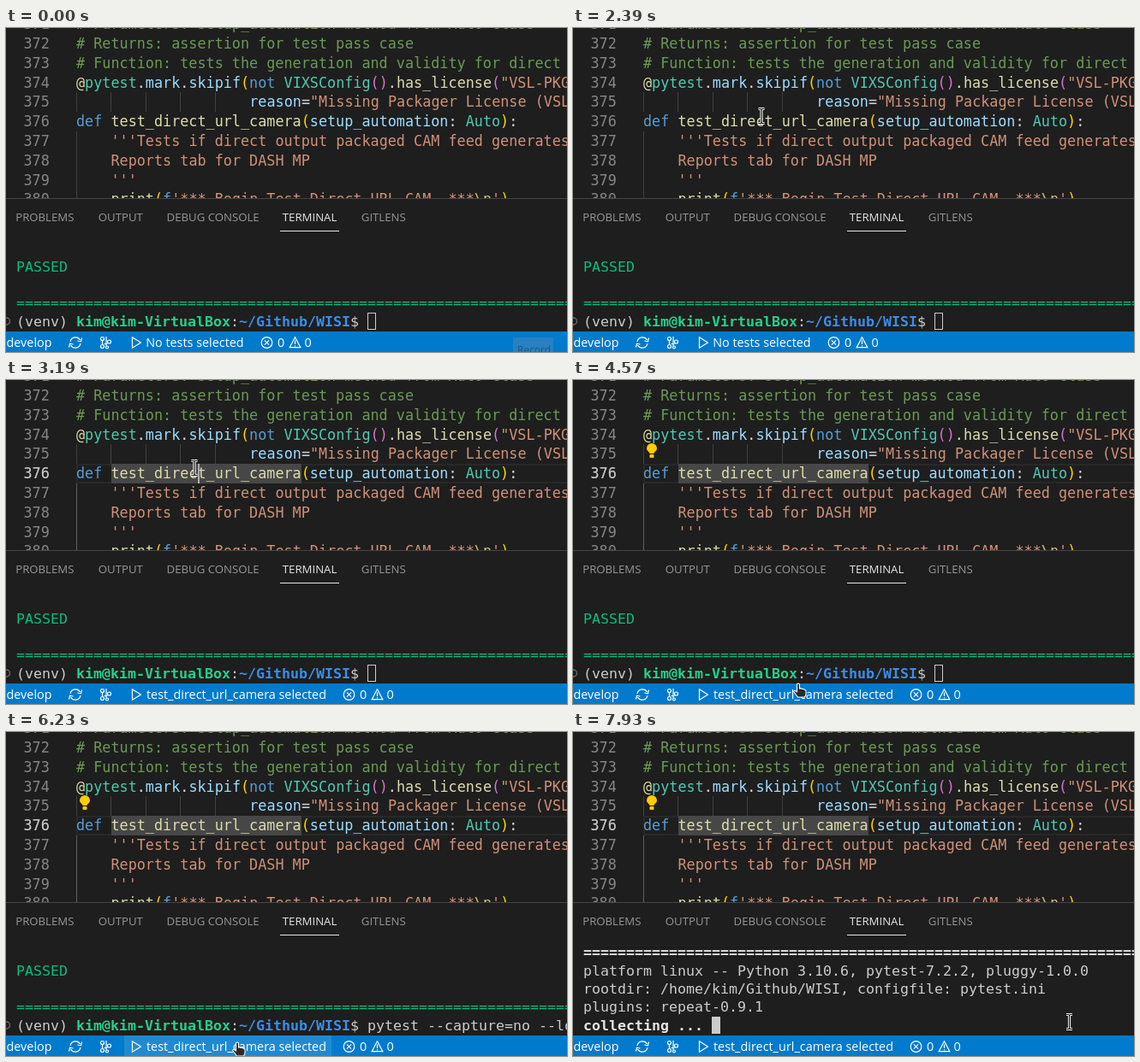
These frames come from a looping animation (655x379 px, 8000 ms). An HTML page:

```html
<!DOCTYPE html>
<html lang="en">
<head>
<meta charset="utf-8">
<title>Editor and terminal</title>
<style>
html, body { margin: 0; width: 100%; height: 100%; overflow: hidden; background: #1e1e1e; }
svg { display: block; }
text { white-space: pre; fill: #d4d4d4; }
.code { font: 16.8px "DejaVu Sans Mono", monospace; }
.term { font: 16.61px "DejaVu Sans Mono", monospace; fill: #ccc; }
.tab { font: 13.2px "Open Sans", "Noto Sans", sans-serif; fill: #979797; }
.bar { font: 14.4px "Open Sans", "Noto Sans", sans-serif; fill: #fff; }
.num { fill: #858585; }
.now { fill: #c6c6c6; }
.com { fill: #6a9955; }
.key { fill: #569cd6; }
.fn { fill: #dcdcaa; }
.var { fill: #9cdcfe; }
.cls { fill: #4ec9b0; }
.str { fill: #ce9178; }
.esc { fill: #d7ba7d; }
.b1 { fill: #ffd700; }
.b2 { fill: #da70d6; }
.ok { fill: #0dbc79; }
.user { fill: #23d18b; font-weight: bold; }
.path { fill: #3b8eea; font-weight: bold; }
.bold { fill: #e5e5e5; font-weight: bold; }
.on { fill: #e7e7e7; }
.icon { fill: none; stroke: #fff; stroke-width: 1.2; }
</style>
</head>
<body>
<svg id="stage" width="655" height="379" viewBox="0 0 655 379"></svg>
<script>
const LOOP = 8000, CHAR = 10.114, LEFT = 82, NUM_X = 20.5;
const rule = '='.repeat(70);

// Parts are plain strings or [class, string] pairs.
const text = (cls, x, y, ...parts) => `<text class="${cls}" x="${x}" y="${y}">` +
  parts.map(p => typeof p === 'string' ? p : `<tspan class="${p[0]}">${p[1]}</tspan>`).join('') + '</text>';
const rect = (x, y, w, h, fill, more = '') =>
  `<rect x="${x}" y="${y}" width="${w}" height="${h}" fill="${fill}" ${more}/>`;
const group = (id, ...items) => `<g id="${id}">${items.join('')}</g>`;

const rowTop = n => Math.round(98 + (n - 376) * 22.8);
const baseline = n => Math.round(115.2 + (n - 376) * 22.8);
const codeLine = (n, indent, ...parts) =>
  text('code num', NUM_X, baseline(n), String(n)) +
  text('code', LEFT + indent * CHAR, baseline(n), ...parts);
const guides = (first, last, cols) => cols.map(c =>
  rect(Math.round(LEFT + c * CHAR), rowTop(first), 1, rowTop(last + 1) - rowTop(first), '#404040')).join('');

// Terminal rows count up from the bottom one.
const termLine = (up, ...parts) => text('term', 12, Math.round(348.6 - up * 21.3), ...parts);
const prompt = (up, command = '') =>
  `<circle cx="0.5" cy="${343 - up * 21}" r="4" fill="none" stroke="#6a6a6a" stroke-width="1.4"/>` +
  termLine(up, '(venv) ', ['user', 'kim@kim-VirtualBox'], ':', ['path', '~/Github/WISI'], '$ ' + command);
const command = 'pytest --capture=no --log-cli-level';

const counts = x =>
  `<g class="icon" transform="translate(${x} 368)">
    <circle r="6.3"/><path d="M-2.6-2.6 2.6 2.6M2.6-2.6-2.6 2.6"/>
    <path d="M33-6.3 39.3 5.6H26.7ZM33-2.5V2M33 3.2V4.4"/></g>` +
  text('bar', x + 12.5, 373, '0') + text('bar', x + 44, 373, '0');

const editor = [
  guides(375, 375, [0, 4, 8, 12, 16]), guides(377, 380, [0]),
  codeLine(371, 0, ['com', '# Parameters: setup_automation method from Auto class']),
  codeLine(372, 0, ['com', '# Returns: assertion for test pass case']),
  codeLine(373, 0, ['com', '# Function: tests the generation and validity for direct']),
  codeLine(374, 0, ['fn', '@'], ['cls', 'pytest'], '.', ['var', 'mark'], '.', ['var', 'skipif'], ['b1', '('],
    ['key', 'not'], ' ', ['cls', 'VIXSConfig'], ['b2', '()'], '.', ['fn', 'has_license'], ['b2', '('], ['str', '"VSL-PKG']),
  codeLine(375, 20, ['var', 'reason'], '=', ['str', '"Missing Packager License (VSL']),
  group('row', rect(83, 99, 600, 21, 'none', 'stroke="#282828" stroke-width="2"')),
  group('hoverWord', rect(123, 98, 222, 23, '#264f78', 'opacity=".3"')),
  group('word', rect(123, 98, 222, 23, '#474747')),
  codeLine(376, 0, ['key', 'def'], ' ', ['fn', 'test_direct_url_camera'], ['b1', '('],
    ['var', 'setup_automation'], ': ', ['cls', 'Auto'], ['b1', ')'], ':'),
  codeLine(377, 4, ['str', "'''Tests if direct output packaged CAM feed generates"]),
  codeLine(378, 4, ['str', 'Reports tab for DASH MP']),
  codeLine(379, 4, ['str', "'''"]),
  codeLine(380, 4, ['fn', 'print'], ['b1', '('], ['key', 'f'], ['str', "'*** Begin Test Direct URL CAM  ***"],
    ['esc', '\\n'], ['str', "'"], ['b1', ')']),
  group('active', rect(82, rowTop(377), 1, 102, '#606060'),
    text('code now', NUM_X, baseline(376), '376')),
  group('caret', rect(224, 98, 2, 23, '#aeafad')),
  group('bulb', '<path d="M89.5 86C89.5 84 86 83 86 80A6 6 0 0 1 98 80C98 83 94.5 84 94.5 86Z" fill="#fc0"/>',
    rect(89.5, 87, 5, 4, '#fc0', 'rx="1"')),
  group('tip', rect(123.5, 30.5, 560, 67, '#252526', 'stroke="#454545"'),
    rect(124, 64, 560, 1, '#454545'),
    text('code', 133, 53, '(', ['key', 'function'], ') ', ['key', 'def'], ' ', ['fn', 'test_direct_url_camera'],
      '(', ['var', 'setup_automation'], ': ', ['cls', 'Auto']),
    text('bar', 133, 86, 'Tests if direct output packaged CAM feed generates Reports tab for DASH MP'))
].join('');

const panel = [
  rect(0, 199, 655, 180, '#1e1e1e'), rect(0, 199, 655, 1, '#444'),
  text('tab', 11.2, 226, 'PROBLEMS'), text('tab', 107.8, 226, 'OUTPUT'),
  text('tab', 187.6, 226, 'DEBUG CONSOLE'), text('tab on', 322.8, 226, 'TERMINAL'),
  text('tab', 414.8, 226, 'GITLENS'), rect(320, 237, 69, 1, '#e7e7e7'),
  group('before', termLine(3, ['ok', 'PASSED']), termLine(1, ['ok', rule])),
  group('idle', prompt(0), '<rect x="422.5" y="333.5" width="9" height="19" fill="none" stroke="#ccc"/>'),
  group('typed', prompt(0, command)),
  group('entered', termLine(4, ['ok', 'PASSED']), termLine(2, ['ok', rule]),
    prompt(1, command), rect(12, 333, 10, 20, '#ccc')),
  group('output', termLine(4, ['bold', rule]),
    termLine(3, 'platform linux -- Python 3.10.6, pytest-7.2.2, pluggy-1.0.0'),
    termLine(2, 'rootdir: /home/kim/Github/WISI, configfile: pytest.ini'),
    termLine(1, 'plugins: repeat-0.9.1'),
    termLine(0, ['bold', 'collecting ... ']), rect(162, 333, 10, 20, '#ccc'))
].join('');

const statusBar = [
  rect(0, 355, 655, 24, '#007acc'),
  group('testHover', rect(138, 355, 242, 24, '#fff', 'opacity=".12"')),
  group('countHover', rect(387, 355, 72, 24, '#fff', 'opacity=".12"')),
  text('bar', 0.5, 373, 'develop'),
  `<g class="icon"><path d="M75 367A6.2 6.2 0 0 1 86.5 365M87 369A6.2 6.2 0 0 1 75.5 371M88.5 362.5 87.500 366.8 83.5 366M73.5 373.5 74.5 369.2 78.5 370"/>
    <circle cx="112.5" cy="363.5" r="2"/><circle cx="112.5" cy="372.5" r="2"/><circle cx="120.5" cy="367" r="2"/><circle cx="118" cy="373.5" r="1.5"/>
    <path d="M112.5 365.5V370.5M117 361V372M114.5 369.5H118.5"/>
    <path d="M147.5 361.8 157.5 368 147.5 374.2Z"/></g>`,
  group('none', text('bar', 163.2, 373, 'No tests selected'), counts(304.5)),
  group('chosen', text('bar', 164, 373, 'test_direct_url_camera selected'), counts(400.5)),
  group('record', rect(592, 362, 47, 17, '#2a7fc0'),
    '<text x="597" y="381" font-size="12" font-family="Open Sans, sans-serif" style="fill:#175a91">Record</text>')
].join('');

const beam = 'M-3.5-8.5H-1.5Q0-8.5 0-7Q0-8.5 1.5-8.5H3.5M0-7V7M-3.5 8.5H-1.5Q0 8.5 0 7Q0 8.5 1.5 8.5H3.5';
const pointers = group('pointer',
  group('beam', `<path d="${beam}" fill="none" stroke="#fff" stroke-width="3.2"/><path d="${beam}" fill="none" stroke="#111" stroke-width="1.2"/>`),
  group('hand', '<path d="M-1.5.8Q0-.8 1.5.8V6Q3.2 5 4.3 6.5Q6 5.7 7 7.2Q9 7 9 9V12Q9 14 7.5 16H-.5L-5 10Q-5.5 8-3.5 8.5L-1.5 10Z" fill="#2b2b2b" stroke="#fff" stroke-width="1.1" stroke-linejoin="round"/>'),
  group('arrow', '<path d="M0 0V14L3.4 10.8 5.8 16 8 15 5.7 10H10.3Z" fill="#111" stroke="#fff" stroke-linejoin="round"/>'));

document.getElementById('stage').innerHTML = editor + panel + statusBar + pointers;

const parts = Object.fromEntries([...document.querySelectorAll('g[id]')].map(g => [g.id, g]));
const show = (id, visible) => parts[id].setAttribute('visibility', visible ? 'inherit' : 'hidden');

// Pointer moves: first step, last step, number of steps, goal.
const moves = [
  [530, 1280, 10, 479, 240],
  [1350, 1970, 10, 223, 89],
  [2170, 2390, 4, 220, 103],
  [3720, 4570, 13, 263, 355],
  [4640, 5240, 8, 270, 363],
  [6890, 7650, 11, 494, 363],
  [7720, 7930, 4, 579.5, 339]
];
const ease = p => p * p * (3 - 2 * p);

function pointerAt(t) {
  let x = 630, y = 376;
  for (const [start, end, steps, goalX, goalY] of moves) {
    if (t < start) break;
    const step = Math.min(steps, 1 + Math.floor((t - start) / (end - start) * (steps - 1) + 1e-6));
    const p = ease(step / steps);
    x += (goalX - x) * p;
    y += (goalY - y) * p;
  }
  return [x, y];
}

function draw(t) {
  const within = (a, b = LOOP) => t >= a && t < b;
  const [x, y] = pointerAt(t);
  const overBar = y >= 354;
  const overTest = overBar && x >= 138 && x < 380;
  const overCounts = overBar && x >= 387 && x < 459;
  const overText = !overBar && (y < 199 || y > 240);

  show('record', within(0, 70));
  show('hoverWord', within(2660, 2920));
  show('tip', within(2660, 2920));
  parts.tip.setAttribute('opacity', t < 2730 ? 0.5 : 1);
  show('active', within(2920));
  show('row', within(2920));
  show('caret', within(2920, 6100) && Math.floor((t - 2955) / 500) % 2 === 0);
  show('word', within(3190));
  show('bulb', within(3260));
  show('none', within(0, 2990));
  show('chosen', within(2990));
  show('before', within(0, 6300));
  show('idle', within(0, 6170));
  show('typed', within(6170, 6300));
  show('entered', within(6300, 6630));
  show('output', within(6630));
  show('testHover', overTest && y > 355);
  show('countHover', overCounts);
  show('pointer', within(530));
  show('beam', overText);
  show('hand', overTest || overCounts);
  show('arrow', !overText && !overTest && !overCounts);
  parts.pointer.setAttribute('transform', `translate(${x.toFixed(1)} ${y.toFixed(1)})`);
}

const begin = performance.now();
function tick() {
  draw((performance.now() - begin) % LOOP);
  requestAnimationFrame(tick);
}
tick();
</script>
</body>
</html>
```
